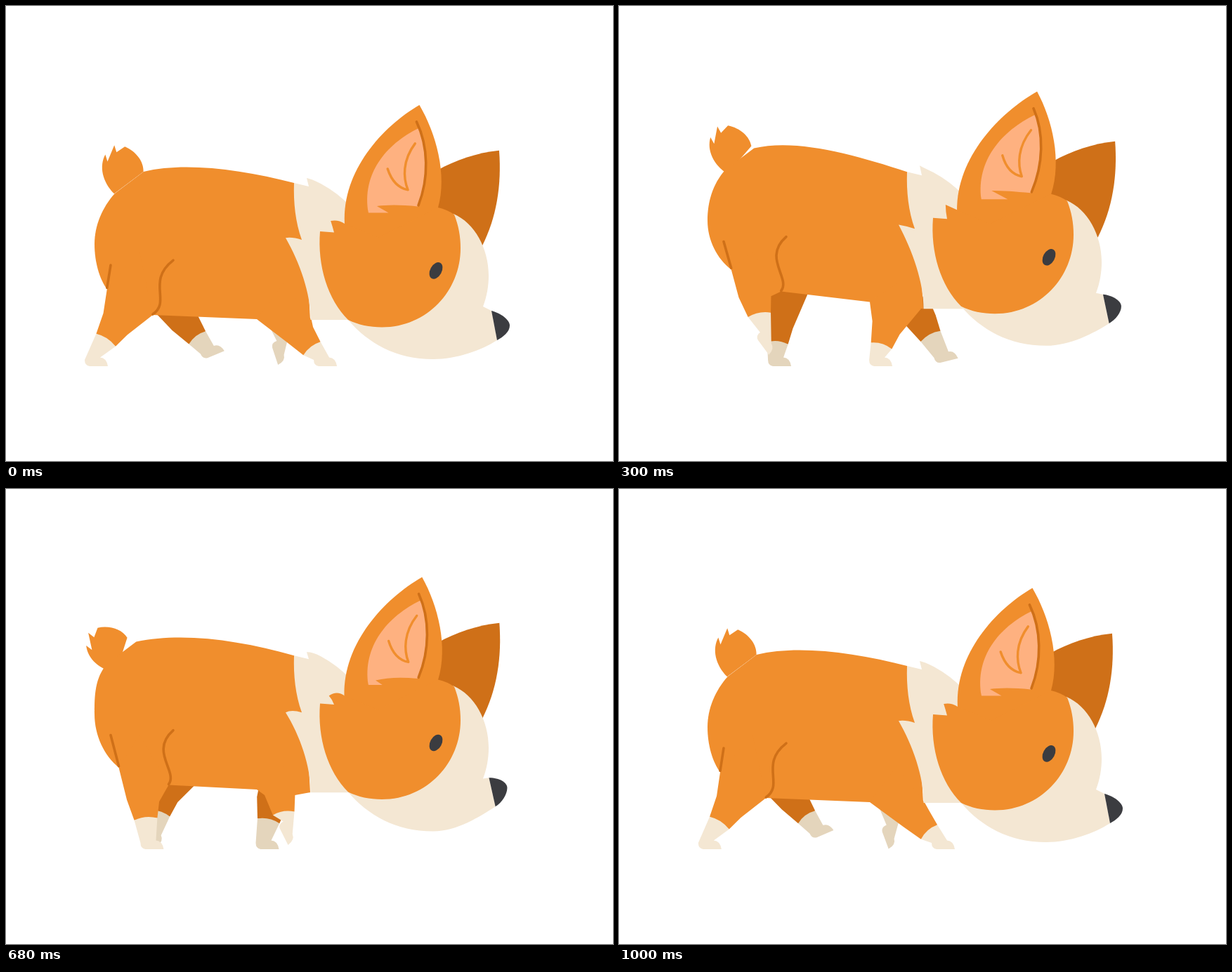
These frames come from a looping animation (864 px wide and 648 px high, 1.02 s). An HTML page with a canvas:

```html
<!DOCTYPE html>
<html lang="en">
<head>
<meta charset="utf-8">
<title>Walking corgi</title>
<style>
html, body { margin: 0; width: 100%; height: 100%; overflow: hidden; background: #fff; }
canvas { display: block; }
</style>
</head>
<body>
<canvas id="stage" width="864" height="648"></canvas>
<script>
const ctx = document.getElementById('stage').getContext('2d');
const LOOP = 1020, HALF = LOOP / 2, STEP = 20, BOB = 500, GROUND = 513;
const ORANGE = '#f08e2d', DARK = '#cf7018', CREAM = '#f4e7d3', SHADE = '#e4d5bc',
      PINK = '#feb180', INK = '#3b3c40', PUFF = '#b5a085';

// land: touchdown time; air: swing time; front, span: reach of the foot on the ground
const nearHind = { land: 510, air: 510, front: 267, span: 152, rise: 42, hip: [192, 400], shin: 35, width: 33 };
const farHind = { land: 40, air: 510, front: 294, span: 116, rise: 42, hip: [232, 420], shin: 25, width: 30 };
const nearFront = { land: 1000, air: 360, front: 448, span: 112, rise: 33, hip: [390, 430], shin: 22, width: 31 };
const farFront = { land: 320, air: 510, front: 459, span: 117, rise: 33, hip: [394, 380], shin: 33, width: 32 };

const mix = (a, b, s) => a + (b - a) * s;
const smooth = x => {
  const s = Math.min(1, Math.max(0, x));
  return s * s * (3 - 2 * s);
};
// A hump from 0 to 1 and back; a higher power makes it narrower.
const hump = (t, lag, power, period = BOB) => Math.abs(Math.sin(Math.PI * (t - lag) / period)) ** power;

const fill = (color, d) => {
  ctx.fillStyle = color;
  ctx.fill(new Path2D(d));
};
const stroke = (color, width, d) => {
  ctx.strokeStyle = color;
  ctx.lineWidth = width;
  ctx.stroke(new Path2D(d));
};
function shifted(x, y, paint) {
  ctx.save();
  ctx.translate(x, y);
  paint();
  ctx.restore();
}

// Curve from a to b that bulges to one side by k.
function arc(ax, ay, bx, by, k) {
  const x = bx - ax, y = by - ay;
  return `C${ax + .35 * x + k * y} ${ay + .35 * y - k * x} ${ax + .75 * x + k * y} ${ay + .75 * y - k * x} ${bx} ${by}`;
}

// Foot: slides back on the ground, then swings forward, toes down and then up.
function stepFoot(leg, t) {
  const since = (t - leg.land + LOOP) % LOOP;
  if (since < HALF) {
    const slide = 1 - (1 - since / HALF) ** 1.6;
    return { x: leg.front - leg.span * slide, y: GROUND, turn: 0 };
  }
  const q = Math.min(1, (since - HALF) / leg.air);
  return {
    x: leg.front - leg.span * (1 - q ** 1.2),
    y: GROUND - leg.rise * Math.sin(Math.PI * q),
    turn: q < .8 ? 1.26 * Math.sin(Math.PI * q / .8) : -.42 * Math.sin(Math.PI * (q - .8) / .2)
  };
}

// Ankle and knee lie on the line from the foot to the hip.
function poseLeg(leg, t) {
  const { x, y, turn } = stepFoot(leg, t);
  const cos = Math.cos(turn), sin = Math.sin(turn);
  const sole = (u, v) => [x + u * cos - v * sin, y + u * sin + v * cos];
  const [cx, cy] = sole(8, -8);
  const hx = leg.hip[0] - cx, hy = leg.hip[1] - cy, len = Math.hypot(hx, hy);
  const dx = hx / len, dy = hy / len;
  const joint = (up, side) => [
    cx + (leg.shin + up) * dx - side * leg.width * dy,
    cy + (leg.shin + up) * dy + side * leg.width * dx
  ];
  return { sole, joint, backKnee: joint(30, -.73), frontKnee: joint(23, .65) };
}

function drawLeg(leg, back, front, coat, sock, inner = []) {
  const { sole, joint } = leg;
  const heel = joint(0, -.5), shin = joint(0, .5);
  fill(coat, `M${back}L${leg.backKnee}L${heel}L${shin}L${leg.frontKnee}L${front}L${inner.length ? inner : back}Z`);
  fill(sock, `M${heel}L${sole(-3, -9)}Q${sole(-3, -1)} ${sole(4, 0)}L${sole(30, 0)}` +
    `Q${sole(28, -12)} ${sole(19, -12.5)}L${shin}Q${joint(6, 0)} ${heel}Z`);
}

function drawTail(rump, wag) {
  shifted(175 - .3 * wag, rump - 88 + .1 * wag, () => {
    ctx.rotate(-wag * Math.PI / 180);
    fill(ORANGE, `M-21 16${arc(-21, 16, -33, -40, .22)}L-30 -30L-20 -53L-17 -43L-5 -51${arc(-5, -51, 21, -15, .2)}Z`);
  });
}

function drawCollar(chest, tuft) {
  shifted(0, chest, () => fill(CREAM,
    `M410 252L431 257L428 ${249 - 6 * tuft}Q${437 - 4 * tuft} ${247 - tuft} 448 253Q472 266 490 285L520 400L490 447H433.5` +
    `C434 410 418 365 398 ${336 - 9 * tuft}Q${405 + 4 * tuft} ${328 + tuft} 421 333C412 308 409 280 410 252Z`));
}

function drawBody(t, rump, chest) {
  const hind = poseLeg(nearHind, t), front = poseLeg(nearFront, t);
  const wag = 36 * hump(t, -60, 4), drop = rump - 339;
  const [kx, ky] = hind.backKnee;
  const bx = mix(149, kx, .5), by = mix(rump + 30, ky, .5);
  const fx = mix(hind.frontKnee[0], 245, .5), fy = rump + 101;
  const elbow = [357, 446 + .75 * chest + .38 * drop];
  const breast = [400 + .08 * front.joint(0, 0)[0], 447 + chest];
  const lx = 155 - .3 * wag, ly = rump - 72;

  drawTail(rump, wag);
  fill(ORANGE, `M${lx} ${ly}L${lx + 41} ${rump - 103}` +
    `C252 ${rump - 117} 333 ${232 + .8 * chest + .25 * drop} 410 ${252 + chest}` +
    `L425 ${300 + chest}L433 ${447 + chest}L${elbow}L${fx} ${fy}L${bx} ${by}` +
    `C${mix(126, bx, .4)} ${mix(rump, by, .78)} 126 ${mix(rump, by, .4)} 126 ${rump}` +
    `C126 ${rump - 26} ${lx - 18} ${mix(ly, rump, .28)} ${lx} ${ly}Z`);
  drawLeg(hind, [bx, by], [fx, fy], ORANGE, CREAM, [190, 350]);
  drawLeg(front, elbow, breast, ORANGE, CREAM, [395, 395]);
  stroke(DARK, 3.6, `M149 ${rump + 30}L${bx} ${by - 2}`);
  stroke(DARK, 3.6, `M238 ${rump + 23}C${mix(197, fx, .2)} ${rump + 53} ${mix(255, fx, .42)} ${fy - 19} ${fx} ${fy - 1}`);
}

function drawFarLegs(t, rump) {
  const hind = poseLeg(farHind, t), front = poseLeg(farFront, t);
  drawLeg(hind, [210, rump + 95], [271, rump + 99], DARK, SHADE);
  drawLeg(front, front.joint(55, -.75), front.joint(55, .75), DARK, SHADE);
}

function drawFarEar(t, nod) {
  const flop = hump(t, 85, 2);
  shifted(6 * flop, nod + 9 * flop, () =>
    fill(DARK, 'M700.4 203.5C670 206.5 638 217 612 232L598 243L603 298L658 348L676 340C697 298 704 253 700.4 203.5Z'));
}

function drawFace(t, tuft) {
  const n = hump(t, 0, 2, BOB / 2);
  const tx = 691 - 6 * n, ty = 434 - 12 * n, bx = 699 - 4 * n, by = 476 - 14 * n;
  const px = 717 - 6 * n, py = 455 - 23 * n;
  fill(CREAM, `M600 300L637 296C667 309 687 345 687 384C687 400 684 415 679 428L${tx} ${ty}L${bx} ${by}` +
    `C${bx - 22} ${by + 14} 642 503 608 503C555 503 515 480 487 447L550 400Z`);
  fill(INK, `M${tx} ${ty}C${705 - 5 * n} ${438 - 19 * n} ${px} ${py - 8} ${px} ${py}` +
    `C${px} ${py + 9} ${bx + 9} ${by - 5} ${bx} ${by}Z`);
  fill(ORANGE, 'M447 321C443 370 458 418 487 447C501 454 518 457.5 535 457.5C600 457.5 647 405 647 345' +
    'C647 328 644 312 638 297Q628 290 615 287L560 265L482 310' +
    `Q${470 + 3 * tuft} ${300 + 6 * tuft} ${457 + 8 * tuft} ${314 - 12 * tuft}Q${464 + tuft} ${316 - 3 * tuft} 467 322.5Z`);
  ctx.fillStyle = INK;
  ctx.beginPath();
  ctx.ellipse(612, 377, 8.2, 12.6, .5, 0, 7);
  ctx.fill();
}

function drawNearEar(t, tuft) {
  const lean = .048 * hump(t, 40, 2);
  ctx.transform(1, 0, -lean, 1, 290 * lean, 0);
  fill(ORANGE, 'M588 141C535 172 478 235 482 310L530 330L615 287C628 240 612 182 588 141Z');
  fill(PINK, `M587 174C540 197 506 240 516 294.5H${527 + 27 * tuft}L${524 + 6 * tuft} ${291 - 9 * tuft}` +
    'Q550 282 586 285.5C600 245 599 205 587 174Z');
  stroke(DARK, 3.6, 'M584 165C601 200 602 245 587 284');
  stroke(ORANGE, 3.4, 'M582 196C564 220 565 245 572 262C556 259 548 247 543 232');
}

function drawSniff(t) {
  const end = smooth((t - 370) / 110), start = smooth((t - 450) / 150);
  if (end <= start) return;
  const rays = [[719, 429, 18, -25.5], [737, 447, 19, -3.5], [728, 468, 20, 12.5]];
  for (const [x, y, vx, vy] of rays) {
    const at = s => `${x + vx * s} ${y + vy * s}`;
    stroke(PUFF, 4.6, `M${at(start)}L${at(end)}`);
  }
}

function draw(t) {
  const nod = 1.3 - 21 * hump(t, 20, 1.3);
  const chest = -16.8 * hump(t, 0, 1.3);
  const rump = 341.5 - 36 * hump(t, 42, 2);
  const tuft = 1 - hump(t, -140, 4);
  ctx.fillStyle = '#fff';
  ctx.fillRect(0, 0, 864, 648);
  ctx.lineCap = ctx.lineJoin = 'round';
  drawFarLegs(t, rump);
  drawFarEar(t, nod);
  drawBody(t, rump, chest);
  drawCollar(chest, tuft);
  shifted(0, nod, () => {
    drawFace(t, tuft);
    drawSniff(t);
    drawNearEar(t, tuft);
  });
}

const begin = performance.now();
function tick() {
  const t = (performance.now() - begin) % LOOP;
  draw(Math.floor(t / STEP) * STEP);
  requestAnimationFrame(tick);
}
tick();
</script>
</body>
</html>
```
